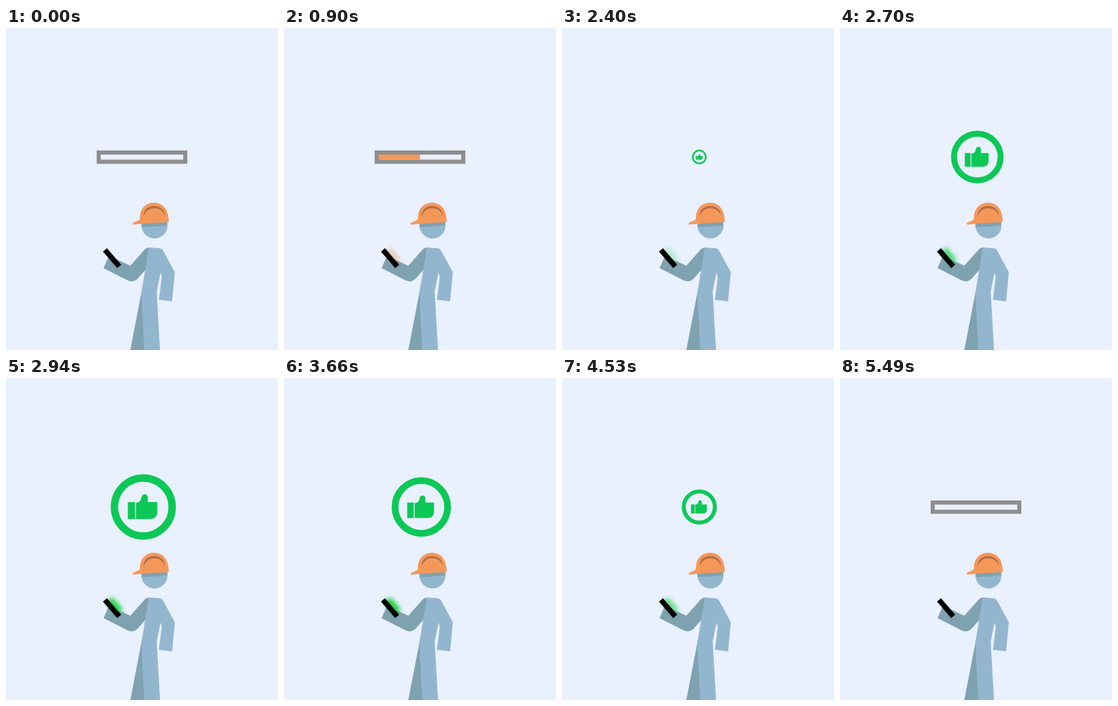
An HTML page for the animation above (5610 ms loop, 396 by 468 pixels).

```html
<!DOCTYPE html>
<html lang="en">
<head>
<meta charset="utf-8">
<title>Worker loading and approval</title>
<style>
  html, body { margin: 0; width: 100%; height: 100%; overflow: hidden; background: #e9f0fe; }
  svg { display: block; width: 100%; height: 100%; }
</style>
</head>
<body>
<svg viewBox="0 0 396 468" xmlns="http://www.w3.org/2000/svg">
  <defs>
    <filter id="blur" x="-60%" y="-60%" width="220%" height="220%">
      <feGaussianBlur stdDeviation="3.4"/>
    </filter>
    <clipPath id="face"><circle cx="216.2" cy="287" r="18.9"/></clipPath>
  </defs>
  <rect width="396" height="468" fill="#e9f0fe"/>

  <g id="bar">
    <rect id="fill" x="138" y="183.8" width="0" height="7.4" fill="#f4985a"/>
    <rect x="135" y="181" width="126" height="13.4" fill="none" stroke="#8e8e8e" stroke-width="6"/>
  </g>

  <g id="icon" fill="#0cc856">
    <circle r="38.3" fill="none" stroke="#0cc856" stroke-width="9.8"/>
    <rect x="-20.5" y="-6.5" width="9.5" height="22.5"/>
    <path d="M-9.7-5.7Q-5-6-3.5-9L-2.3-13.5Q-1.2-16.8 2-16.8Q6-16.5 6-12L5.8-6.5H18.6V6Q18.6 16 8.5 16H-9.7Z"/>
  </g>

  <!-- far leg and arm -->
  <g fill="#7fa2b0">
    <path d="M198 380L181 468H203Z"/>
    <path d="M209 319Q204 319 201 323L181 345.5L150 331L142 349L177 366.8Q185 370.5 191.5 364.5L206 348Z"/>
  </g>
  <!-- body -->
  <path fill="#93b6cf" d="M208 319L222 320Q227 320 229 324L245.8 355L241.8 397.3L222.6 395L226.8 362L225 355.5L219.4 383L224.2 468H201.3L197 385Z"/>

  <g id="head">
    <circle cx="216.2" cy="287" r="18.9" fill="#93b6cf"/>
    <path clip-path="url(#face)" fill="#7fa2b0" d="M190 280H240V286L216 288.6L190 290Z"/>
    <path fill="#f4985a" d="M184.6 285.8V283.3L193.6 279.3Q195 279 195 276C195 262 204 254 215.5 254C228 254 237 263 237 282.3Q211 283 184.6 285.8Z"/>
    <path fill="#b36e45" d="M200 274C200.5 264 207 258.8 215.5 258.8C224.5 258.8 231 264.5 231.5 272.5C228 265 222.5 262 215.5 262C208.5 262 203 266.5 200 274Z"/>
  </g>

  <path id="glow" d="M150 322.5L165.5 340" stroke-width="12" fill="none" filter="url(#blur)"/>
  <path d="M144.1 322.4L164.8 346.5" stroke="#000" stroke-width="7.6"/>
</svg>
<script>
  const LOOP = 5610;
  const $ = id => document.getElementById(id);
  const bar = $('bar'), fill = $('fill'), icon = $('icon'), head = $('head'), glow = $('glow');

  const part = (t, a, b) => Math.min(1, Math.max(0, (t - a) / (b - a)));
  const inOut = u => (1 - Math.cos(Math.PI * u)) / 2;
  const out = u => Math.sin(Math.PI * u / 2);
  const ramp = (t, a, b) => inOut(part(t, a, b));

  // Pop up past full size, settle, later shrink away.
  function iconScale(t) {
    const grow = 1.1 * out(part(t, 2305, 2970));
    return (grow - 0.1 * ramp(t, 2970, 3095)) * (1 - ramp(t, 4350, 4760));
  }

  function draw(t) {
    const loaded = ramp(t, 0, 1800);
    const barOut = ramp(t, 1870, 2280);
    const late = t > 5000;
    fill.setAttribute('width', late ? 0 : 119.6 * loaded);
    bar.setAttribute('opacity', late ? ramp(t, 5290, 5490) : 1 - barOut);

    const s = iconScale(t);
    icon.setAttribute('transform', `translate(199.9 187.5) scale(${s})`);
    icon.setAttribute('visibility', s > 0.001 ? 'visible' : 'hidden');

    const nod = ramp(t, 3640, 3910) - ramp(t, 3910, 4185);
    head.setAttribute('transform', `rotate(${-10.5 * nod} 216.2 287)`);

    const green = t > 2290;
    const lit = 1 - (1 - part(t, 2290, 3095)) ** 2;
    glow.setAttribute('stroke', green ? '#18d13c' : '#f4985a');
    glow.setAttribute('opacity', green ? lit * (1 - ramp(t, 4350, 4760)) : 0.85 * loaded * (1 - barOut));
  }

  const start = performance.now();
  function tick() {
    draw((performance.now() - start) % LOOP);
    requestAnimationFrame(tick);
  }
  tick();
</script>
</body>
</html>
```
